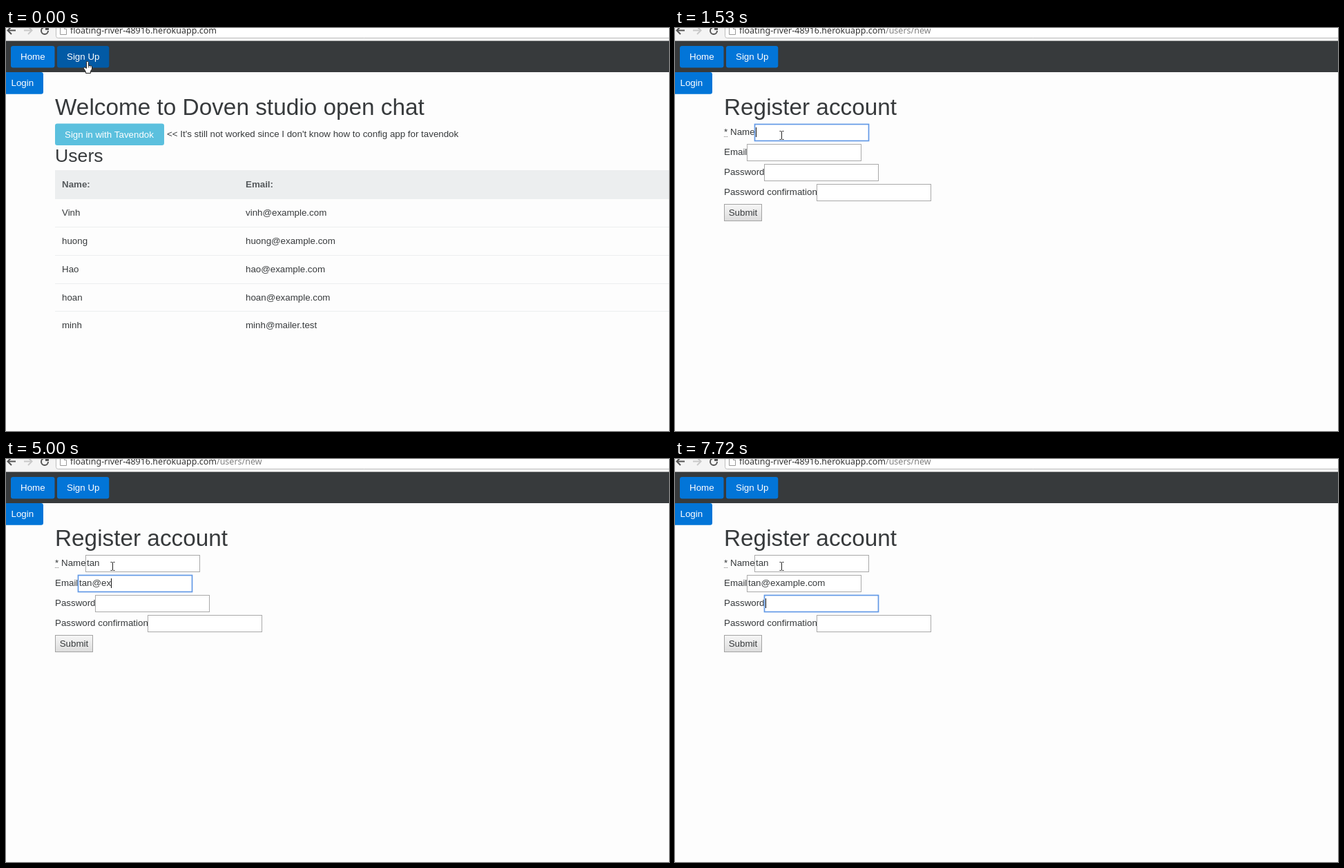
An HTML page with a canvas for the animation above (8000 ms loop, 960 by 584 pixels).

```html
<!DOCTYPE html>
<html lang="en">
<head>
<meta charset="utf-8">
<title>Register account</title>
<style>
html, body { margin: 0; width: 100%; height: 100%; overflow: hidden; background: #fdfdfd; }
canvas { display: block; }
</style>
</head>
<body>
<canvas id="stage" width="960" height="584"></canvas>
<script>
const ctx = document.getElementById('stage').getContext('2d');
const LOOP = 8000;
const SANS = '"Liberation Sans", Arial, sans-serif';
const BODY = `13.333px ${SANS}`;
const INK = '#373a3c', BLUE = '#0275d8', DEEP_BLUE = '#025aa5';
const NAME = 'tan', EMAIL = 'tan@example.com';

const USERS = [
  ['Vinh', 'vinh@example.com'],
  ['huong', 'huong@example.com'],
  ['Hao', 'hao@example.com'],
  ['hoan', 'hoan@example.com'],
  ['minh', 'minh@mailer.test']
];

// [start time, shape, x, y]
const POINTER = [
  [0, 'hand', 118, 56], [270, 'hand', 121, 58], [390, 'arrow', 129, 72],
  [510, 'arrow', 138, 86], [630, 'arrow', 144, 95], [750, 'beam', 146, 97],
  [870, 'beam', 156, 119], [1010, 'beam', 162, 139], [1130, 'beam', 165, 156],
  [1260, 'beam', 160, 163], [1380, 'beam', 154, 155]
];

// [start time, characters typed]
const NAME_KEYS = [[0, 0], [1780, 1], [2080, 2], [2360, 3]];
const EMAIL_KEYS = [
  [0, 0], [3680, 1], [3940, 3], [4350, 4], [4750, 5], [5000, 6], [5410, 7],
  [5540, 8], [6060, 9], [6500, 10], [6640, 11], [6920, 12], [7190, 14], [7450, 15]
];
const FOCUS = [[0, ''], [1530, 'name'], [3250, 'email'], [7720, 'password']];

const latest = (steps, t) => steps.filter(step => step[0] <= t).pop();

function text(str, x, y, color = INK, font = BODY) {
  ctx.font = font;
  ctx.fillStyle = color;
  ctx.fillText(str, x, y);
}

function rect(x, y, w, h, color) {
  ctx.fillStyle = color;
  ctx.fillRect(x, y, w, h);
}

function path(points, closed) {
  ctx.beginPath();
  points.forEach(([x, y]) => ctx.lineTo(x, y));
  if (closed) ctx.closePath();
}

function line(points, color, width) {
  path(points);
  ctx.strokeStyle = color;
  ctx.lineWidth = width;
  ctx.stroke();
}

function button(label, x, y, w, h, textX, color) {
  ctx.beginPath();
  ctx.roundRect(x, y, w, h, 3.3);
  ctx.fillStyle = color;
  ctx.fill();
  text(label, textX, y + 20, '#fff');
}

function toolbar(t) {
  rect(0, 0, 960, 19, '#f4f4f4');
  ctx.beginPath();
  ctx.roundRect(72.5, -10, 900, 24.5, 3);
  ctx.fillStyle = '#fff';
  ctx.fill();
  ctx.strokeStyle = '#bdbdbd';
  ctx.lineWidth = 1;
  ctx.stroke();
  rect(0, 18, 960, 1, '#b4b4b4');

  line([[14, 3.5], [3, 3.5]], '#555', 2);
  line([[8, -2], [2.5, 3.5], [8, 9]], '#555', 2);
  line([[26, 3.5], [37, 3.5]], '#c9c9c9', 2);
  line([[32, -2], [37.5, 3.5], [32, 9]], '#c9c9c9', 2);
  ctx.beginPath();
  ctx.arc(56, 4, 5, 0, Math.PI * 1.75);
  ctx.strokeStyle = '#555';
  ctx.lineWidth = 2;
  ctx.stroke();
  rect(57, 0, 5, 3, '#555');

  line([[78.5, -3], [78.5, 9.5], [87.5, 9.5], [87.5, 1.5], [84.5, 1.5], [84.5, -2]], '#999', 1);

  const font = '12.5px "Noto Sans", sans-serif';
  const host = 'floating-river-48916.herokuapp.com';
  text(host, 93, 8, '#333', font);
  if (t >= 510) text('/users/new', 93 + ctx.measureText(host).width, 8, '#808080', font);
}

function navigation(t) {
  rect(0, 19, 960, 45, INK);
  button('Home', 7, 26, 63.5, 31.5, 21, BLUE);
  button('Sign Up', 74, 26, 75.3, 31.5, 88, t < 750 ? DEEP_BLUE : BLUE);
  button('Login', -6, 64, 60, 31.7, 7.5, BLUE);
}

function heading(str) {
  text(str, 71, 126, INK, `33.333px ${SANS}`);
}

function usersPage() {
  heading('Welcome to Doven studio open chat');
  button('Sign in with Tavendok', 71, 138.5, 158, 31.5, 85, '#5bc0de');
  text("<< It's still not worked since I don't know how to config app for tavendok", 233, 158);
  text('Users', 71, 193.5, INK, `26.667px ${SANS}`);

  rect(71, 206, 889, 42, '#eceeef');
  text('Name:', 81, 231, '#55595c', `bold ${BODY}`);
  text('Email:', 347, 231, '#55595c', `bold ${BODY}`);
  USERS.forEach(([name, email], i) => {
    const y = Math.round(272.4 + 40.7 * i);
    text(name, 81, y);
    text(email, 347, y);
    if (i) rect(71, y - 25, 889, 1, '#eceeef');
  });
}

function field(label, labelX, x, y, value, focused, caretOn) {
  text(label, labelX, y + 16);
  rect(x, y, 165, 24, '#fff');
  ctx.strokeStyle = focused ? '#6299e6' : '#a9a9a9';
  ctx.lineWidth = focused ? 1.7 : 1;
  ctx.strokeRect(x + 0.5, y + 0.5, 165, 24);
  text(value, x + 2, y + 16);
  if (focused && caretOn) {
    rect(Math.round(x + 1.7 + ctx.measureText(value).width), y + 5, 1, 14, '#111');
  }
}

function registerPage(t) {
  const focus = latest(FOCUS, t)[1];
  const name = NAME.slice(0, latest(NAME_KEYS, t)[1]);
  const email = EMAIL.slice(0, latest(EMAIL_KEYS, t)[1]);

  heading('Register account');
  text('*', 71, 155);
  for (let x = 71; x < 77; x += 2) rect(x, 157, 1, 1, '#777');
  field('Name', 80, 115, 139, name, focus === 'name', t < 2860);
  field('Email', 71, 104, 168, email, focus === 'email', true);
  field('Password', 71, 129, 197, '', focus === 'password', true);
  field('Password confirmation', 71, 205, 226, '', false, false);

  const shade = ctx.createLinearGradient(0, 255, 0, 280);
  shade.addColorStop(0, '#f7f7f7');
  shade.addColorStop(1, '#dcdcdc');
  rect(71, 255, 54, 24, shade);
  ctx.strokeStyle = '#a3a3a3';
  ctx.lineWidth = 1;
  ctx.strokeRect(71.5, 255.5, 54, 24);
  text('Submit', 77.7, 272);
}

const OUTLINES = {
  arrow: [[0, 0], [0, 14], [3, 11], [5.2, 16], [7.4, 15], [5.2, 10.2], [9.5, 10]],
  hand: [[-2, -8], [0, -8], [1, -7], [1, -2], [4, -2], [6, -1], [6, 3], [4, 6],
    [4, 9], [-3, 9], [-3, 7], [-6, 2], [-5, 0], [-2, 2], [-2, -7]]
};

function pointer(t) {
  const [, shape, x, y] = latest(POINTER, t);
  ctx.save();
  ctx.translate(x + 0.5, y + 0.5);
  if (shape === 'beam') {
    line([[0, -6], [0, 6]], '#222', 1);
    for (const end of [-6, 6]) {
      line([[-3, end], [-1, end]], '#222', 1);
      line([[1, end], [3, end]], '#222', 1);
    }
  } else {
    path(OUTLINES[shape], true);
    ctx.fillStyle = '#fff';
    ctx.fill();
    ctx.strokeStyle = '#222';
    ctx.lineWidth = 1;
    ctx.stroke();
    if (shape === 'hand') {
      line([[1, -2], [1, 1]], '#222', 0.8);
      line([[3.5, -2], [3.5, 1]], '#222', 0.8);
    }
  }
  ctx.restore();
}

function draw() {
  const t = performance.now() % LOOP;
  rect(0, 0, 960, 584, '#fdfdfd');
  toolbar(t);
  navigation(t);
  if (t < 750) usersPage();
  else registerPage(t);
  pointer(t);
  requestAnimationFrame(draw);
}
draw();
</script>
</body>
</html>
```
